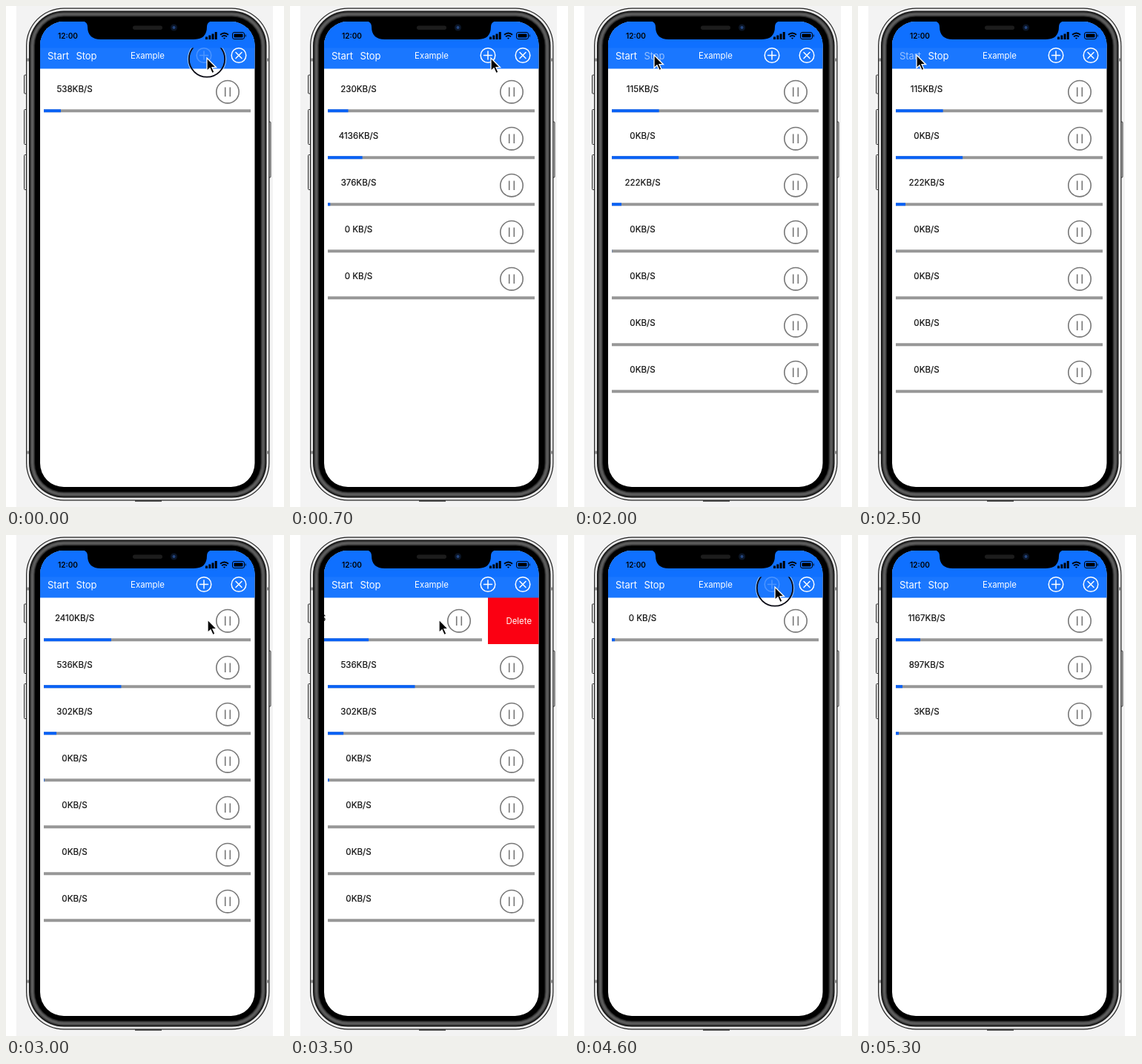
An HTML page that plays this animation: 375x675 px, repeating every 5.4 s.

```html
<!DOCTYPE html>
<html lang="en">
<head>
<meta charset="utf-8">
<title>Download list</title>
<style>
  html, body { margin: 0; width: 100%; height: 100%; overflow: hidden; background: #fff; }
  svg { display: block; }
  text { font: 11.4px Inter, Roboto, sans-serif; }
  .nav { fill: #fff; stroke: #fff; }
  .nav text { stroke: none; }
  .bar { font-size: 13px; letter-spacing: -.1px; }
  .icon { fill: none; stroke-width: 1.5; stroke-linecap: round; }
  .pause { fill: none; stroke: #777; stroke-width: 1.6; }
  .speed { font-size: 11.6px; fill: #111; stroke: #111; stroke-width: .2; }
</style>
</head>
<body>
<svg width="375" height="675" viewBox="0 0 375 675">
  <defs>
    <clipPath id="screen"><rect x="46" y="21" width="289.5" height="627" rx="32"/></clipPath>
    <clipPath id="video"><rect x="46" y="56.500" width="289.5" height="592"/></clipPath>
  </defs>

  <rect x="14" width="346" height="675" fill="#f3f3f3"/>

  <!-- phone body -->
  <g fill="#ddd" stroke="#333">
    <rect x="24.5" y="93" width="4" height="25" rx="1"/>
    <rect x="24.5" y="139.5" width="4" height="47" rx="1"/>
    <rect x="24.5" y="200.5" width="4" height="47" rx="1"/>
    <rect x="353" y="156" width="4" height="75" rx="1"/>
    <path d="M174 667H210" stroke-width="1.4"/>
  </g>
  <g id="body"></g>
  <path d="M28 72.500h3M351 72.500h3M28 601.500h3M351 601.500h3" stroke="#888" stroke-width="4"/>

  <g clip-path="url(#screen)">
    <rect x="46" y="20" width="290" height="628" fill="#fff"/>
    <g id="list"></g>
    <rect x="46" y="20" width="290" height="64.500" fill="#1a77ff"/>
    <rect x="46" y="20" width="290" height="36.500" fill="#0f70ff"/>

    <g class="nav">
      <text id="start" class="bar" x="56" y="71.500">Start</text>
      <text id="stop" class="bar" x="94.500" y="71.500">Stop</text>
      <text x="191" y="71" text-anchor="middle">Example</text>
      <g id="add" class="icon"><circle cx="267" cy="66.500" r="9.800"/><path d="M261.500 66.500h11M267 61v11"/></g>
      <g id="clear" class="icon"><circle cx="314" cy="66.500" r="9.800"/><path d="M310 62.500l8 8M318 62.500l-8 8"/></g>
    </g>

    <!-- status bar -->
    <text x="70" y="43.500" style="font-size:10px;font-weight:600">12:00</text>
    <path d="M269 41.500h3v3.500h-3zM273.300 39.500h3v5.500h-3zM277.500 37.500h3v7.500h-3zM281.700 35h3v10h-3z"/>
    <g fill="none" stroke="#000">
      <path d="M289 38.800q5.500-4.600 11 0M291 41.300q3.500-2.900 7 0" stroke-width="1.800"/>
      <path d="M292.800 42.700h3.400l-1.700 2z" fill="#000" stroke="none"/>
      <rect x="305.500" y="35.500" width="16" height="9" rx="2.500"/>
      <rect x="307.500" y="37.500" width="12" height="5" rx="1" fill="#000" stroke="none"/>
      <path d="M323.200 38.500v3"/>
    </g>

    <!-- notch -->
    <path d="M102 20q8 1 8 8q0 17 18 17H253q18 0 18-17q0-7 8-8z"/>
    <rect x="171" y="26.500" width="40" height="5.500" rx="2.700" fill="#1c1c1c"/>
    <circle cx="226.500" cy="29" r="4.500" fill="#0b1526"/>
    <circle cx="226.500" cy="29" r="2" fill="#24457f"/>

    <g clip-path="url(#video)">
      <g id="ring" fill="none">
        <circle r="25.500" stroke="#fff" stroke-opacity=".5" stroke-width="1.500"/>
        <circle r="24.200" stroke="#0a0a14" stroke-width="1.800"/>
      </g>
      <path id="cursor" d="M0 0V17.500L4 13.800 7 20.600 10 19.300 7 12.700H12.500Z" stroke="#fff" stroke-width="1.300"/>
    </g>
  </g>
</svg>

<script>
const LOOP = 5400, STEP = 100, BEAT = 600, PITCH = 63, TRAVEL = 300;
const STOP_AT = 1900, START_AT = 2500, DELETE_AT = 3700, CLEAR_AT = 4200, AGAIN_AT = 4400;
const $ = id => document.getElementById(id);
const clamp = v => Math.min(1, Math.max(0, v));
const smooth = v => v * v * (3 - 2 * v);
const svg = html => {
  const g = document.createElementNS("http://www.w3.org/2000/svg", "g");
  g.innerHTML = html;
  return g;
};

// downloading time, without the pause between Stop and Start
const active = t => t - (START_AT - STOP_AT) * clamp((t - STOP_AT) / (START_AT - STOP_AT));

// a bar grows by `gain` pixels along a power curve; a new speed is shown every beat
const download = (from, to, gain, power, beat, speeds, done = 0) => ({ from, to, gain, power, beat, speeds, done });
const tapped = n => n * 2 * STEP + STEP;
const items = [
  download(0, DELETE_AT, 111, 2.2, 0, [538, 230, 902, 115, 2410], 23),
  download(tapped(0), CLEAR_AT, 132, .6, 1, [4136, 1528, 0, 536, 1955]),
  download(tapped(1), CLEAR_AT, 26, 1, 1, [376, 573, 222, 302, 347]),
  download(tapped(2), CLEAR_AT, 4, 4, 3, [0, 0, 3]),
  ...[3, 4, 5].map(n => download(tapped(n), CLEAR_AT, 0, 1, 3, [0])),
  ...[[33, 1167], [9, 897], [4, 3]].map(([gain, speed], n) =>
    download(AGAIN_AT + tapped(n), LOOP, gain, 1, 7, [speed]))
];

const spots = {
  add: [271, 70], stop: [108, 66], start: [79, 66], cell: [272, 114],
  swiped: [201, 114], remove: [309, 116], clear: [314, 66], away: [271, 28]
};
const visits = [
  ["add", 0], ["stop", 1800], ["start", 2400], ["cell", 3000], ["swiped", 3500],
  ["remove", DELETE_AT], ["clear", 4000], ["add", AGAIN_AT], ["away", 5200]
];

function pointer(t) {
  const i = visits.findLastIndex(v => v[1] <= t);
  const [from, left] = visits[i], [to, at] = visits[i + 1] || visits[i];
  const k = smooth(clamp(1 - (at - t) / Math.min(TRAVEL, at - left || 1)));
  return spots[from].map((v, axis) => v + (spots[to][axis] - v) * k);
}

function pressed(t) {
  const tap = t % (2 * STEP) === 0;
  if (tap && (t <= 1000 || t >= AGAIN_AT && t <= 4800)) return "add";
  return { [STOP_AT]: "stop", [START_AT - STEP]: "start", [DELETE_AT]: "remove", [CLEAR_AT - STEP]: "clear" }[t];
}

function filled(item, t) {
  const begin = active(item.from), end = active(Math.min(item.to, LOOP) - STEP);
  return item.done + item.gain * clamp((active(t) - begin) / (end - begin)) ** item.power;
}

function label(item, t) {
  const n = Math.floor(active(t) / BEAT) - item.beat;
  return n < 0 ? "0 KB/S" : item.speeds[Math.min(n, item.speeds.length - 1)] + "KB/S";
}

const shell = (inset, fill) =>
  `<rect x="${27 + inset}" y="${2.5 + inset}" width="${328.5 - 2 * inset}" height="${664 - 2 * inset}" rx="${51 - inset}" fill="${fill}"/>`;
let layers = shell(0, "#222") + shell(1.2, "#e9e9e9") + shell(4, "#111");
for (let inset = 5; inset <= 12; inset++) {
  const grey = 95 * Math.sin((inset - 4) / 8 * Math.PI);
  layers += shell(inset, `rgb(${grey} ${grey} ${grey})`);
}
$("body").append(svg(layers));

items.forEach(item => {
  item.row = svg(`
    <rect class="red" x="267" y="84" width="69" height="63" fill="#fb0012"/>
    <text class="red" x="291.500" y="120" fill="#fff">Delete</text>
    <g class="cell">
      <text class="speed" x="92.500" y="116" text-anchor="middle"></text>
      <g class="pause"><circle cx="299" cy="115.700" r="15.200"/><path d="M295.700 109.500v12.500M302.300 109.500v12.500"/></g>
      <path d="M51 141.200H330" stroke="#979797" stroke-width="4"/>
      <rect class="fill" x="51" y="139.200" height="4" fill="#0a62f5"/>
    </g>`);
  item.part = name => item.row.querySelector("." + name);
  $("list").append(item.row);
});

function draw(t) {
  // rows below the deleted one slide up into its place
  const gap = t >= DELETE_AT && t < CLEAR_AT ? 1 - smooth(clamp((t - DELETE_AT + STEP) / 300)) : 0;
  let index = 0;
  items.forEach((item, i) => {
    const shown = t >= item.from && t < item.to;
    item.row.style.display = shown ? "" : "none";
    if (!shown) return;
    const swipe = i ? 0 : 71 * smooth(clamp((t - 3500 + TRAVEL) / TRAVEL));
    item.row.setAttribute("transform", `translate(0 ${(index++ + gap) * PITCH})`);
    item.row.querySelectorAll(".red").forEach(e => e.style.display = swipe ? "" : "none");
    item.part("red").setAttribute("x", 338 - swipe);
    item.part("cell").setAttribute("transform", `translate(${-swipe} 0)`);
    item.part("speed").textContent = label(item, t);
    item.part("fill").setAttribute("width", filled(item, t));
  });

  const [x, y] = pointer(t), press = pressed(t);
  $("cursor").setAttribute("transform", `translate(${x} ${y})`);
  $("ring").setAttribute("transform", `translate(${x} ${y + 1.5})`);
  $("ring").style.display = press ? "" : "none";
  for (const id of ["add", "clear"]) $(id).style.opacity = press === id ? .22 : 1;
  // text buttons stay dimmed one step longer
  for (const id of ["stop", "start"]) $(id).style.opacity = [press, pressed(t - STEP)].includes(id) ? .55 : 1;
}

function tick() {
  draw(Math.floor(performance.now() % LOOP / STEP) * STEP);
  requestAnimationFrame(tick);
}
tick();
</script>
</body>
</html>
```
